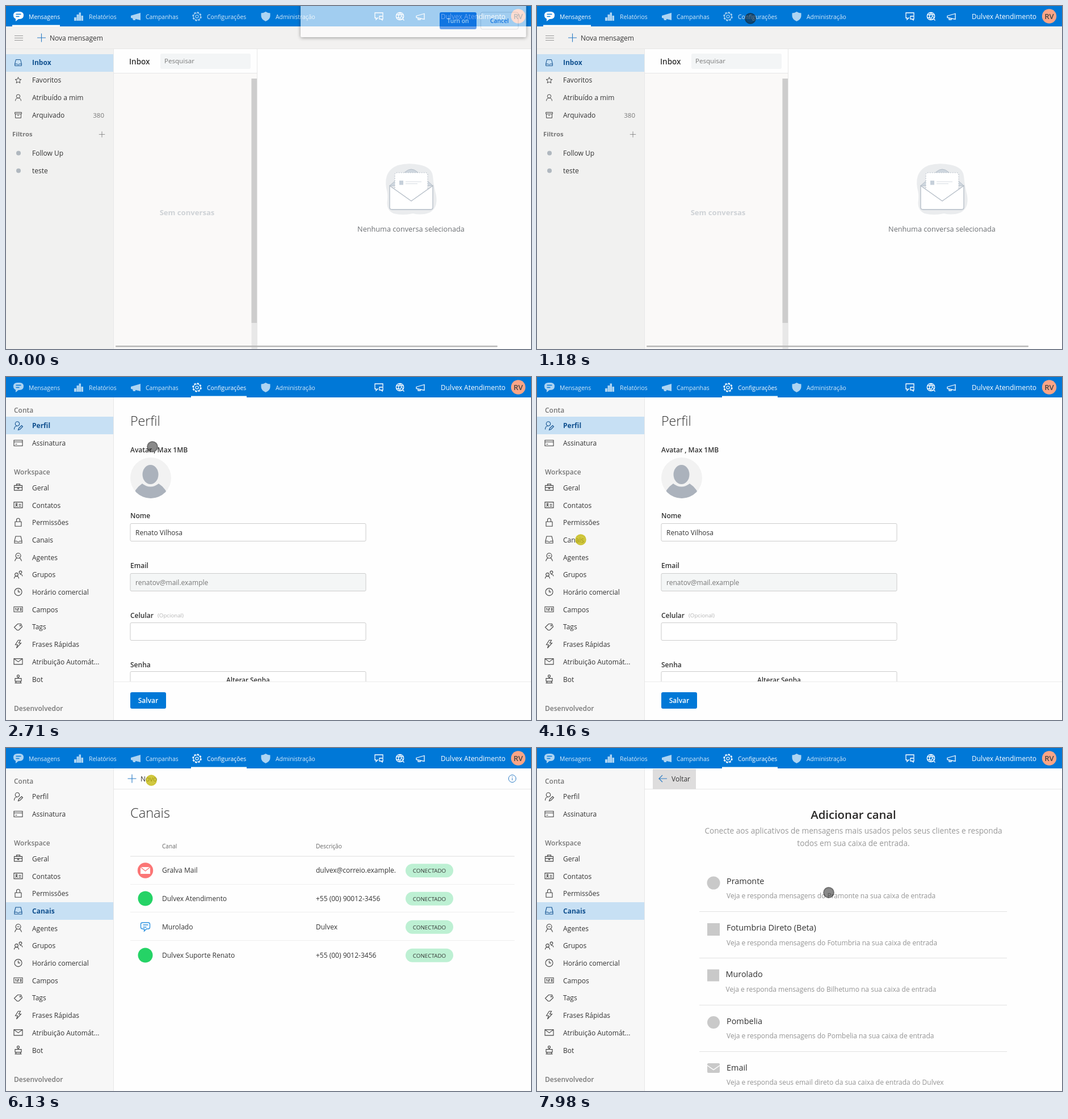
An HTML page for the animation above (8000 ms loop, 925 by 605 pixels).

```html
<!DOCTYPE html>
<html lang="pt-BR">
<head>
<meta charset="utf-8">
<title>Canais</title>
<style>
html, body { margin: 0; width: 100%; height: 100%; overflow: hidden; background: #fefefe; }
svg { display: block; font-family: "Open Sans", "Noto Sans", sans-serif; }
text { white-space: pre; }
</style>
</head>
<body>
<svg id="stage" width="925" height="605" viewBox="0 0 925 605"></svg>
<script>
const BLUE = '#0078d7', INK = '#333', LINE = '#e6e6e6', PALE = '#c7e0f4', DEEP = '#10508f';

// Markup helpers
const text = (x, y, s, size = 12, fill = INK, weight = 400, anchor = 'start') =>
  `<text x="${x}" y="${y}" font-size="${size}" fill="${fill}" font-weight="${weight}" text-anchor="${anchor}">${s}</text>`;
const rect = (x, y, w, h, fill, extra = '') =>
  `<rect x="${x}" y="${y}" width="${w}" height="${h}" fill="${fill}" ${extra}/>`;
const disc = (x, y, r, fill, extra = '') => `<circle cx="${x}" cy="${y}" r="${r}" fill="${fill}" ${extra}/>`;
const path = (d, stroke, fill = 'none', width = 1, extra = '') =>
  `<path d="${d}" stroke="${stroke}" fill="${fill}" stroke-width="${width}" ${extra}/>`;
const hline = (x1, x2, y, color = LINE) => path(`M${x1} ${y}H${x2}`, color);
const group = (id, s) => `<g id="${id}">${s}</g>`;
const ring = (x, y, r) => `M${x - r} ${y}a${r} ${r} 0 1 0 ${2 * r} 0a${r} ${r} 0 1 0 ${-2 * r} 0`;

const icons = {
  profile: ring(-1.5, -3, 3.7) + 'M-7 7q0-6 5-6M1 5l5-5 2 2-5 5-3 1z',
  card: 'M-7.5-5h15v10h-15zM-7.5-2h15M-5 2h3',
  brief: 'M-7-3.5h14v8.5h-14zM-3-3.5v-2.5h6v2.5M-7 0h14M-1 0v2h2v-2',
  contact: 'M-7.5-5h15v10h-15zM-5 3q2-4 4 0M1-1h4M1 2h4' + ring(-3, -1.5, 1.3),
  lock: 'M-5.5-1h11v8h-11zM-3-1v-3a3 3 0 0 1 6 0v3',
  tray: 'M-6.5 6v-4l2-8h9l2 8v4zM-6.5 2.5h4q2.5 3 5 0h4',
  agent: ring(0, -2.5, 4.5) + 'M-6 7q1-4 3.5-5.5M6 7q-1-4-3.5-5.5M-2-2.5h4',
  people: ring(-3, 0, 2.8) + ring(4, -4, 2.3) + 'M-7 7q0-4 4-4t4 4M3 0q4-1 4.5 3',
  clock: ring(0, 0, 6.5) + 'M0-4v4h3.5',
  field: 'M-7.5-4.5h15v9h-15zM-5-1l1-1v4M-1.5-2h2v2h-2v2h2M3-2h2v4h-2M3 0h2',
  tag: 'M-7 1l6-6h6l2 5-6 6h-3z' + ring(3.5, -2, .7),
  bolt: 'M0-7h4l-3 5h4l-8 9 2-6h-4z',
  mail: 'M-7.5-5h15v10h-15zM-7.5-5l7.5 5.5 7.5-5.5',
  bot: 'M-5.5-1h11v5h-11zM0-1v-2M-6 7h12M-4 4v3M4 4v3' + ring(0, -5, 2),
  star: 'M0-6l1.7 4 4.3.4-3.3 2.8 1 4.3L0 3.3-3.7 5.5l1-4.3L-6-1.6-1.7-2z',
  person: ring(0, -2.5, 3.5) + 'M-5.5 6.5q0-5.5 5.5-5.5t5.5 5.5',
  box: 'M-6.5-5.5h13v3h-13zM-5.5-2.5v8h11v-8M-2 .5h4',
  plus: 'M-7.5 0h15M0-7.5v15',
  back: 'M7 0h-14l6-6M-7 0l6 6',
  chats: 'M-1 3h-1l-3 3v-3h-2v-9h14v5M1 0h6v5h-1v2l-2-2h-3z',
  globe: ring(0, 0, 6.7) + 'M-6.7-2.5h13.4M-6.7 2.5h6M0-6.7q-5 6.7 0 13.4M0-6.7q3 3 3 6.5M7.5 7.5l-3-3' + ring(3, 3, 2.3),
  horn: 'M-7-1.5l14-4v10l-14-3zM-4 2v3h4v-2',
  bubble: 'M-5-7h10q3 0 3 3v5q0 3-3 3h-3l-4 4v-4h-3q-3 0-3-3v-5q0-3 3-3zM-4-3h9M-4 1h6'
};
const icon = (name, x, y, color = '#444', scale = 1, width = 1.1) =>
  `<g transform="translate(${x} ${y}) scale(${scale})">${path(icons[name], color, 'none', width)}</g>`;

// Top bar
function topBar() {
  const bars = rect(120, 20, 4, 6, '#fff') + rect(124.5, 15, 4, 11, '#fff') +
    rect(128.5, 11.5, 3.5, 14.5, '#fff') + rect(132.5, 17, 3.5, 9, '#fff');
  const chat = path('M20 10h4q7 0 7 6.500t-7 6.500h-2l-5 4v-4.500q-4-1.500-4-6 0-6.500 7-6.500z', 'none', '#fff') +
    path('M17.500 14.500h9M17.500 18.500h6', BLUE, 'none', 1.4);
  const horn = path('M220 17l17-5v13l-17-4zM223 22h5v3h-4z', 'none', '#fff');
  const gear = disc(336.5, 18.5, 7.2, 'none', 'stroke="#fff" stroke-width="2" stroke-dasharray="3.3 2.355"') +
    disc(336.5, 18.5, 6, 'none', 'stroke="#fff"') + disc(336.5, 18.5, 2.5, 'none', 'stroke="#fff" stroke-width="1.2"');
  const shield = path('M457.500 10q4 2.500 8 2.500v5q0 6-8 9.500q-8-3.500-8-9.500v-5q4 0 8-2.500z', 'none', '#fff');
  const tabs = [['Mensagens', 40, chat], ['Relatórios', 146, bars], ['Campanhas', 246, horn],
    ['Configurações', 354, gear], ['Administração', 475, shield]];
  return rect(0, 0, 925, 36, BLUE) +
    tabs.map(([label, x, art], i) => group('tab' + i, `<g class="art">${art}</g>` + text(x, 22.5, label, 10.4, '#fff'))).join('') +
    rect(0, 33.5, 84, 2.5, '#fff', 'id="underline"') +
    icon('chats', 657, 18, '#fff', 1, 1.3) + icon('globe', 694, 18, '#fff', 1, 1.3) + icon('horn', 730, 19, '#fff', 1, 1.3) +
    text(766, 23, 'Dulvex Atendimento', 12, '#fff') +
    disc(902.5, 18, 12.7, '#fba586') + text(902.5, 23, 'RV', 13.2, '#444', 600, 'middle');
}

function inbox() {
  const rows = [['tray', 'Inbox', 100], ['star', 'Favoritos', 131], ['person', 'Atribuído a mim', 161.5], ['box', 'Arquivado', 192.5]];
  const envelope =
    path('M690 281q18-5 38-1q22 4 24 20q1 13 4 26q8 28-9 38q-14 6-30 2q-18 4-34 0q-14-6-11-25q1-9-2-20q-5-30 20-40z', 'none', '#eaecee') +
    path('M676 317l27-24q11-10 22 0l27 24z', '#b3bcc6', '#cfd7df') +
    path('M685 357v-59q0-4 4-4h50q4 0 4 4v59z', '#b3bcc6', '#fff', 1, 'stroke-dasharray="2 2"') +
    rect(693, 308, 7, 7.5, '#c6d0da') + path('M704 310h28M704 313.500h21', '#d5dbe1') +
    path('M676 317l38 27 38-27v38q0 4-4 4h-68q-4 0-4-4z', '#b3bcc6', '#fff', 1.3);
  return rect(0, 36, 925, 40, '#f2f1f0') + rect(0, 75, 190, 530, '#f1f1f0') + hline(0, 925, 75.5, '#e8e7e6') +
    path('M15 52.500h15M15 56.500h15M15 60.500h15', '#999') + icon('plus', 62.5, 56, '#2b7cc5') + text(77, 60.5, 'Nova mensagem') +
    rect(0, 85, 189, 31, PALE) +
    rows.map(([name, label, y], i) => icon(name, 21.5, y, i ? '#444' : DEEP, .9) +
      text(46, y + 4.4, label, 12, i ? INK : DEEP, i ? 400 : 700)).join('') +
    text(173, 196.7, '380', 11.5, '#777', 400, 'end') +
    text(11, 230, 'Filtros', 11.3, '#777', 700) + icon('plus', 169, 226.5, '#777', .7) +
    disc(22, 259.5, 4, '#b0b8bf') + text(46, 263.7, 'Follow Up') + disc(22, 290.5, 4, '#b0b8bf') + text(46, 294.5, 'teste') +
    rect(190, 76, 252, 529, '#faf9f8') + rect(190, 76, 252, 42, '#fefefe') + hline(190, 442, 118.5) +
    path('M189.500 76V605M442.500 76V605', '#e8e8e8') +
    text(217, 103, 'Inbox', 13.5, INK, 600) + rect(272, 84, 159, 27, '#f3f5f6', 'rx="3"') + text(279, 101.3, 'Pesquisar', 11.6, '#777') +
    text(319, 369.3, 'Sem conversas', 13.1, '#ced2d6', 700, 'middle') +
    rect(432.5, 128, 9.5, 477, '#e8e8e8') + rect(432.5, 128, 9.5, 431, '#cdcdcd') +
    envelope + text(713.5, 397.5, 'Nenhuma conversa selecionada', 12.7, '#6c6f73', 400, 'middle') +
    rect(193, 599, 673, 2.5, '#b8b8b8', 'rx="1"');
}

// Settings menu
const menu = [['profile', 'Perfil', 86], ['card', 'Assinatura', 117]].concat(
  [['brief', 'Geral'], ['contact', 'Contatos'], ['lock', 'Permissões'], ['tray', 'Canais'], ['agent', 'Agentes'],
    ['people', 'Grupos'], ['clock', 'Horário comercial'], ['field', 'Campos'], ['tag', 'Tags'], ['bolt', 'Frases Rápidas'],
    ['mail', 'Atribuição Automát...'], ['bot', 'Bot']].map(([name, label], i) => [name, label, 195.4 + i * 30.7]));
const settings = active => rect(0, 36, 190, 569, '#f7f7f7') + path('M189.500 36V605', LINE) +
  [['Conta', 59], ['Workspace', 168], ['Desenvolvedor', 584.5]].map(([s, y]) => text(14, y + 4.3, s, 12, '#777', 600)).join('') +
  menu.map(([name, label, y]) => {
    const on = label === active;
    return (on ? rect(0, Math.floor(y - 15.4), 189, 31, PALE) : '') + icon(name, 21.5, y - .5, on ? DEEP : '#444') +
      text(46, y + 4.4, label, 12, on ? DEEP : INK, on ? 700 : 400);
  }).join('');

function profile() {
  const input = (y, fill, value, color) => rect(219, y, 415, 31, fill, 'rx="2" stroke="#ccc"') + text(228, y + 20, value, 12, color);
  return settings('Perfil') + text(219, 86, 'Perfil', 23.2, INK, 300) +
    [['Avatar , Max 1MB', 128.5], ['Nome', 245], ['Email', 332.5], ['Celular', 420.5], ['Senha', 508]]
      .map(([s, y]) => text(219, y + 4.2, s, 12, INK, 600)).join('') +
    text(267, 424, '(Opcional)', 9.7, '#b5b5b5') +
    '<clipPath id="round"><circle cx="255" cy="178" r="36"/></clipPath>' +
    `<g clip-path="url(#round)">${rect(219, 142, 72, 72, '#f2f2f2')}<ellipse cx="254.5" cy="172" rx="14" ry="17" fill="#abb2bc"/>` +
    path('M222 215Q226 197 240 188Q254.500 199 269 188Q283 197 288 215z', 'none', '#abb2bc') + '</g>' +
    input(258.5, '#fff', 'Renato Vilhosa', INK) + input(346.5, '#f4f6f6', 'renatov@mail.example', '#777') +
    input(433.5, '#fff', '', INK) + input(519.5, '#fff', '', INK) +
    text(426.5, 539, 'Alterar Senha', 11.7, INK, 600, 'middle') +
    rect(190, 538, 735, 67, '#fefefe') + hline(190, 925, 537.5, '#ececec') +
    rect(219, 556, 63, 29, BLUE, 'rx="3"') + text(250.5, 575, 'Salvar', 12, '#fff', 600, 'middle');
}

function channels() {
  const mail = disc(245.5, 216, 13.7, '#fb7676') + path('M237 210h17v12h-17z', 'none', '#fff') + path('M237 210l8.500 7 8.500-7', '#fb7676', 'none', 1.3);
  const green = y => disc(245.5, y, 13, '#25d366');
  const rows = [[216, 'Gralva Mail', 'dulvex@correio.example.', mail],
    [265.5, 'Dulvex Atendimento', '+55 (00) 90012-3456', green(265.5)],
    [315.5, 'Murolado', 'Dulvex', icon('bubble', 245.5, 315, '#2e93e0', 1, 1.4)],
    [365.5, 'Dulvex Suporte Renato', '+55 (00) 9012-3456', green(365.5)]];
  return settings('Canais') + hline(190, 925, 72.5) + icon('plus', 222, 54, '#2b7cc5') + text(237, 58.5, 'Novo') +
    path(ring(892, 54, 6.5) + 'M892 53v4M892 50v1.500', '#2b7cc5') +
    text(219, 123.3, 'Canais', 23.6, INK, 300) +
    text(275, 177, 'Canal', 10.1, '#666') + text(546, 177, 'Descrição', 10.1, '#666') + hline(219, 896, 191, '#dedede') +
    rows.map(([y, name, info, art], i) => art + text(275, y + 4.4, name) + text(546, y + 4.4, info) +
      rect(704, y - 11.8, 84, 24, '#bdf0d3', 'rx="12"') + text(746, y + 4.2, 'CONECTADO', 9.8, INK, 400, 'middle') +
      (i < 3 ? hline(219, 896, Math.floor(y + 25) - .5, '#efefef') : '')).join('');
}

function addChannel() {
  const grey = '#c9c9c9';
  const say = name => `Veja e responda mensagens do ${name} na sua caixa de entrada`;
  const rows = [['Pramonte', say('Pramonte'), disc(311, 238, 11.5, grey)],
    ['Fotumbria Direto (Beta)', say('Fotumbria'), rect(300, 309, 22, 22, grey)],
    ['Murolado', say('Bilhetumo'), rect(300, 390.5, 21, 21, grey)],
    ['Pombelia', say('Pombelia'), disc(311, 484, 11, grey)],
    ['Email', 'Veja e responda seus email direto da sua caixa de entrada do Dulvex',
      rect(300, 556, 22, 17, grey, 'rx="2"') + path('M300 560l11 7.500 11-7.500', '#fff', 'none', 1.5)]];
  return settings('Canais') + hline(190, 925, 72.5) + rect(204, 37, 76, 35.5, '#dedddd') +
    icon('back', 222, 54, '#2b7cc5') + text(237, 58.5, 'Voltar') +
    text(557.5, 125, 'Adicionar canal', 20.3, '#292827', 600, 'middle') +
    text(557.5, 150.5, 'Conecte aos aplicativos de mensagens mais usados pelos seus clientes e responda', 13.65, '#999', 400, 'middle') +
    text(557.5, 173, 'todos em sua caixa de entrada.', 13.65, '#999', 400, 'middle') +
    rows.map(([name, info, art], i) => {
      const y = 235 + i * 82.2, x = i === 2 ? 332.5 : 334;
      return art + text(x, y + 5, name, 14.4) + text(x, y + 30.4, info, 12, '#949494') +
        (i < 4 ? hline(286, 828, Math.floor(y + 53.6) + .5, '#e2e2e2') : '');
    }).join('');
}

const dialog = rect(519, -20, 397.5, 75, '#fff', 'rx="2" style="filter:drop-shadow(0 1px 3px #0009)"') +
  rect(764, 11, 65, 30, '#1a73e8', 'rx="3"') + text(796.5, 30, 'Turn on', 10.3, '#fff', 600, 'middle') +
  rect(836.5, 11, 66, 30, '#fff', 'rx="3" stroke="#cfd3d8"') + text(869.5, 30, 'Cancel', 10.3, '#1a73e8', 600, 'middle');

const stage = document.getElementById('stage');
const pages = ['inbox', 'profile', 'channels', 'addChannel'];
stage.innerHTML = [inbox, profile, channels, addChannel].map((draw, i) => group(pages[i], draw())).join('') +
  rect(181, 38, 6, 431, '#d2d2d2', 'id="sideScroll" rx="3"') + rect(822, 209, 3, 283, '#e8e8e8', 'id="listScroll"') +
  topBar() + group('dialog', dialog) +
  group('cursor', disc(0, 0, 9.5, 'currentColor') + disc(0, 0, 9, 'none', 'stroke="currentColor" stroke-width="2" stroke-opacity=".3"'));
const $ = id => document.getElementById(id);
const show = (id, on) => { $(id).style.display = on ? '' : 'none'; };

// Pictures change in bursts, one every STEP ms after each start
const STEP = 108, LOOP = 8000;
const bursts = [100, 750, 1830, 2710, 4160, 5030, 6130, 7000, 7870];
const swaps = [2154, 4376, 6346];
const clicks = [1830, 4160, 6130];
const track = [[208, 470, 79], [424, 325, 50], [532, 309, 41], [642, 309, 41], [858, 350, 31], [1074, 376, 22],
  [2370, 376, 22], [2586, 335, 65], [2710, 258, 123], [2818, 170, 203], [2926, 108, 260], [3142, 77, 287],
  [4808, 77, 287], [4916, 133, 268], [5138, 238, 115], [5354, 260, 60], [5570, 256, 57], [6778, 256, 57],
  [6886, 248, 61], [7216, 350, 195], [7432, 430, 256], [7540, 436, 260], [7762, 436, 260], [7978, 514, 255]];

function cursorAt(t) {
  const i = track.findIndex(k => k[0] > t);
  if (i < 0) return track[track.length - 1].slice(1);
  const [a, b] = [track[Math.max(0, i - 1)], track[i]];
  const f = i ? (t - a[0]) / (b[0] - a[0]) : 0;
  return [a[1] + (b[1] - a[1]) * f, a[2] + (b[2] - a[2]) * f];
}

function render(now) {
  const t = now % LOOP;
  const start = bursts.filter(b => b <= t).pop();
  const q = start === undefined ? 0 : start + Math.floor((t - start) / STEP) * STEP;
  const page = swaps.filter(s => s <= q).length;
  pages.forEach((id, i) => show(id, i === page));
  const tab = page ? 3 : 0;
  for (let i = 0; i < 5; i++) {
    $('tab' + i).setAttribute('opacity', i === tab ? 1 : .85);
    $('tab' + i).querySelector('.art').setAttribute('opacity', i === tab ? 1 : .8);
  }
  $('underline').setAttribute('x', page ? 326 : 11);
  $('underline').setAttribute('width', page ? 98 : 84);
  show('sideScroll', q >= 4376 && q < 4916);
  show('listScroll', q >= 6346 && q < 6886);
  $('dialog').setAttribute('opacity', .63 * Math.max(0, 1 - q / 316));
  show('cursor', q >= 208);
  $('cursor').setAttribute('transform', `translate(${cursorAt(q)})`);
  const clicked = clicks.some(c => q >= c && q < c + 2 * STEP);
  $('cursor').setAttribute('color', clicked ? '#c4b80c' : '#1c1c1c');
  $('cursor').firstChild.setAttribute('fill-opacity', clicked ? .78 : .52);
}

let begin;
function tick(now) {
  begin ??= now;
  render(now - begin);
  requestAnimationFrame(tick);
}
render(0);
requestAnimationFrame(tick);
</script>
</body>
</html>
```
